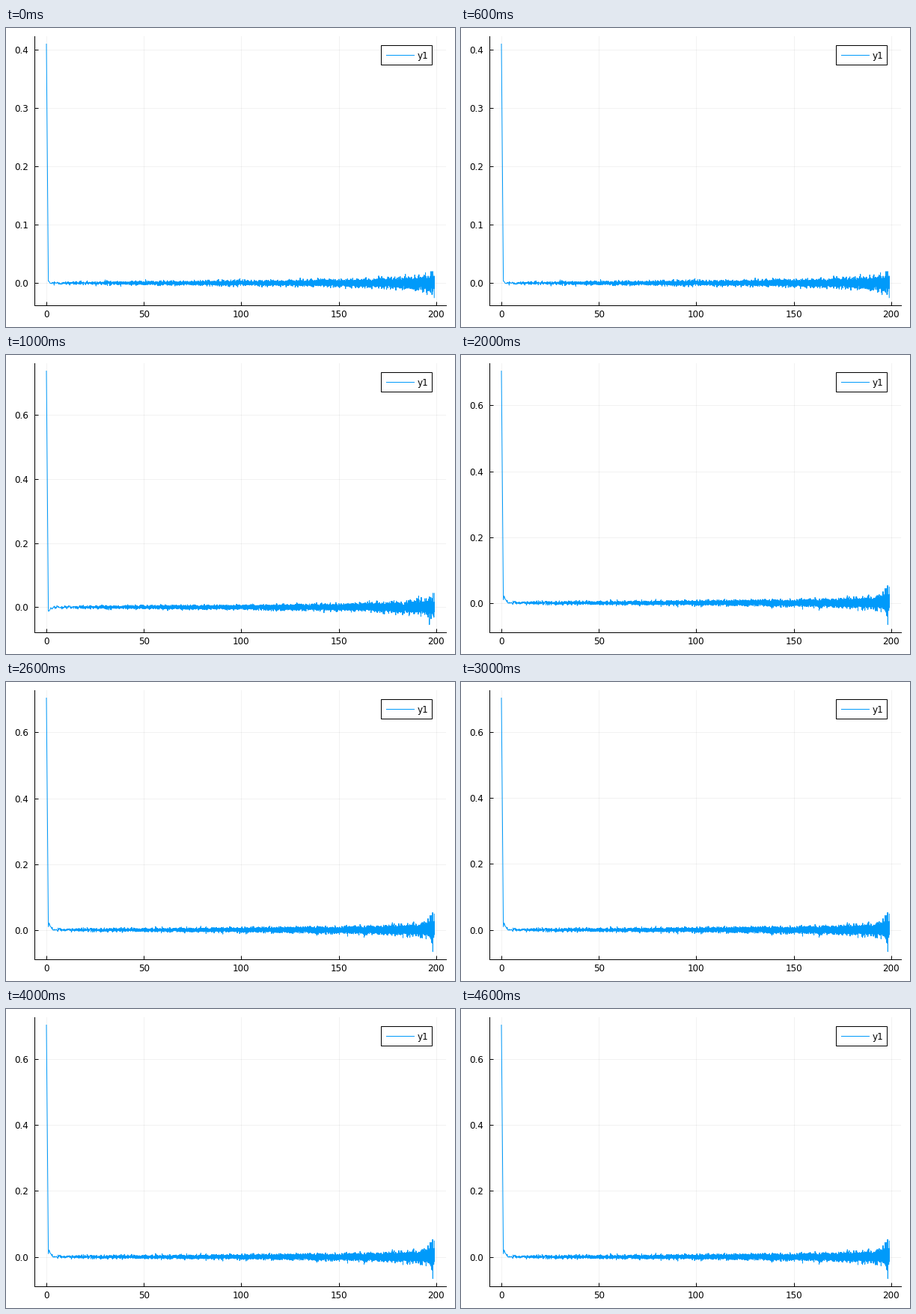
Recreate the animation shown at these times as a matplotlib script. Size 600 px wide and 400 px high, loop 5 s.

```python
import numpy as np
import matplotlib.pyplot as plt
from matplotlib.animation import FuncAnimation
from matplotlib.patches import Rectangle

W, H, DPI = 600, 400, 100
PX = 72 / DPI
BLUE = "#009afa"
LEFT, RIGHT, TOP, BOTTOM = 38.45, 587.8, 11.3, 370.9
SIZE = 200
FRAMES = 5

plt.rcParams.update({
    "font.family": "DejaVu Sans",
    "font.size": 12 * PX,
    "path.simplify": False,
})

# The field settles by the third step: variance, deepest dip, neighbour value
START = [(.410, -.0250, .0005), (.736, -.0543, -.016)]
SETTLED = (.7034, -.066, .020)


def lattice_pairs():
    """Distinct distances on a square lattice and the pairs at each one."""
    dx, dy = np.meshgrid(np.arange(SIZE), np.arange(SIZE))
    pairs = (SIZE - dx) * (SIZE - dy) * np.where((dx > 0) & (dy > 0), 2, 1)
    total = np.bincount((dx**2 + dy**2).ravel(), weights=pairs.ravel())
    sq = np.flatnonzero(total[:(SIZE - 1)**2 + 1])
    return np.sqrt(sq), total[sq]


def state(i):
    if i < len(START):
        return START[i]
    var, low, near = SETTLED
    return var + .0011 * .1**(i - len(START)), low, near


def correlation(i):
    """Noise shrinking with the pair count, plus a short-range bump."""
    var, low, near = state(i)
    rng = np.random.default_rng(min(i, len(START)) + 11)
    noise = 1.35 * var / np.sqrt(count) * rng.standard_normal(r.size)
    y = np.clip(noise, .8 * low, -.8 * low)
    y += near * np.exp(-((r - 1) / 1.2)**2)
    y[0] = var
    y[y.argmin()] = low
    return y


r, count = lattice_pairs()
curves = [correlation(i) for i in range(FRAMES)]

fig = plt.figure(figsize=(W / DPI, H / DPI), dpi=DPI, facecolor="white")
ax = fig.add_axes([LEFT / W, 1 - BOTTOM / H,
                   (RIGHT - LEFT) / W, (BOTTOM - TOP) / H])
ax.set_xlim(-.03 * (SIZE - 1), 1.03 * (SIZE - 1))
ax.set_xticks(range(0, 201, 50))
ax.spines[["top", "right"]].set_visible(False)
ax.spines[["left", "bottom"]].set_linewidth(PX)
ax.tick_params(direction="in", length=5 * PX, width=PX)
ax.tick_params(axis="x", pad=6.6 * PX)
ax.tick_params(axis="y", pad=8 * PX)
ax.grid(color="black", alpha=.05, linewidth=PX)
ax.set_axisbelow(True)
line, = ax.plot([], [], color=BLUE, linewidth=PX)

# Legend, laid out in pixels
key = fig.add_axes([0, 0, 1, 1])
key.set(xlim=(0, W), ylim=(H, 0))
key.axis("off")
key.add_patch(Rectangle((501, 23), 68, 25.5, facecolor="white",
                        edgecolor="black", linewidth=PX))
key.plot([507.5, 544.5], [36, 36], color=BLUE, linewidth=PX)
key.text(549.7, 36, "y1", va="center_baseline")


def draw(i):
    y = curves[i]
    low, high = y.min(), y.max()
    pad = .03 * (high - low)
    ticks = np.arange(0, high, .1 if high < .5 else .2)
    line.set_data(r, y)
    ax.set_ylim(low - pad, high + pad)
    ax.set_yticks(ticks, [f"{t:.1f}" for t in ticks])
    return line,


anim = FuncAnimation(fig, draw, frames=FRAMES, interval=1000,
                     repeat=True, repeat_delay=0, blit=False)
plt.show()
```
